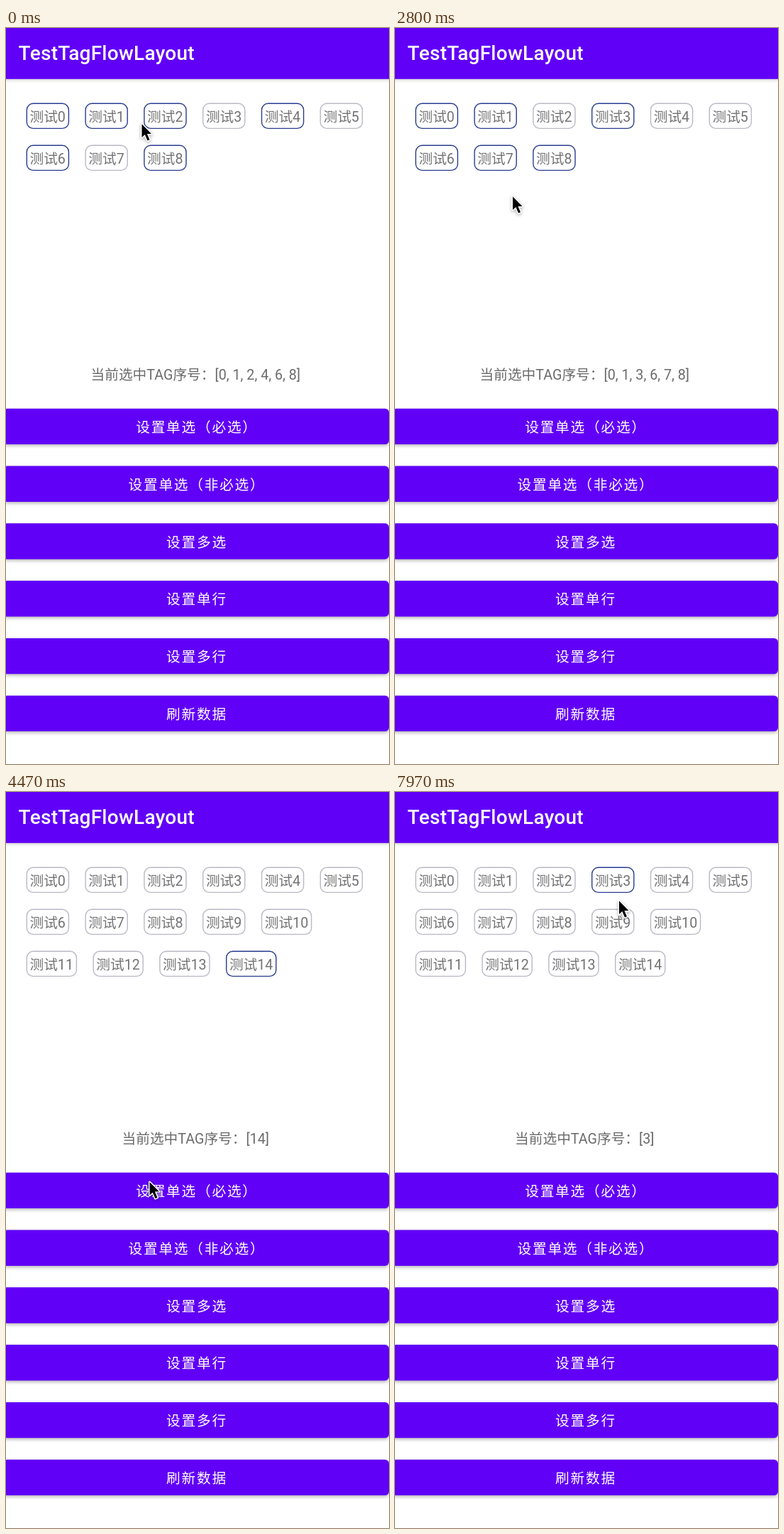
Animation of 540 by 1036 pixels, one loop 8000 ms. Source, as an HTML page with a canvas:

```html
<!DOCTYPE html>
<html lang="zh-CN">
<head>
<meta charset="utf-8">
<title>TestTagFlowLayout</title>
<style>
html, body { margin: 0; width: 100%; height: 100%; overflow: hidden; background: #fff; }
canvas { display: block; width: 540px; height: 1036px; }
</style>
</head>
<body>
<canvas id="stage"></canvas>
<script>
const W = 540, H = 1036, LOOP = 8000;
const PURPLE = '#6100f7';
const FONT = 'Roboto, "Noto Sans CJK SC", "Noto Sans CJK", sans-serif';
const SIZE = 19.7;
const BUTTONS = ['设置单选（必选）', '设置单选（非必选）', '设置多选', '设置单行', '设置多行', '刷新数据'];
const BTN = { x: -4, y: 535.7, w: 544, h: 50.4, step: 80.8, radius: 5.6 };
const TAG = { x: 28.6, y: 105.6, h: 36.5, gap: 22.3, row: 59, right: 515 };
const HOLD = 70; // how long the button stays down before its click

// A click on a tag, or on the first button, which refills the list.
const CLICKS = [
  { at: 530, tag: 2 }, { at: 1130, tag: 3 }, { at: 1830, tag: 4 }, { at: 2430, tag: 7 },
  { at: 3510, refill: 1 }, { at: 4110, refill: 15 },
  { at: 5700, tag: 1 }, { at: 6250, tag: 8 }, { at: 6850, tag: 2 }, { at: 7770, tag: 3 }
];

// Where the pointer wanders between clicks.
const WANDER = [
  { t: 0, x: 191.5, y: 135.3 }, { t: 1470, x: 441.5, y: 130.3 }, { t: 2700, x: 166, y: 237.3 },
  { t: 2800, x: 166, y: 237.3 }, { t: 4470, x: 202.5, y: 549 }, { t: 6530, x: 240.5, y: 120.3 },
  { t: 7300, x: 343, y: 123 }, { t: 7970, x: 316, y: 153.3 }
];

const ctx = document.getElementById('stage').getContext('2d');
const dpr = window.devicePixelRatio || 1;
ctx.canvas.width = W * dpr;
ctx.canvas.height = H * dpr;

const lerp = (a, b, k) => a + (b - a) * k;
const clamp = v => Math.max(0, Math.min(1, v));
const smooth = k => k * k * (3 - 2 * k);

function layoutTags(count) {
  let { x, y } = TAG;
  return Array.from({ length: count }, (_, i) => {
    const w = i < 10 ? 60.5 : 71.5;
    if (x + w > TAG.right) {
      x = TAG.x;
      y += TAG.row;
    }
    const box = { x, y, w };
    x += w + TAG.gap;
    return box;
  });
}

// Replays the clicks; after a refill only one tag stays selected.
function stateAt(t) {
  let count = 9, selected = [0, 1, 2, 4, 6, 8], single = false;
  for (const { at, tag, refill } of CLICKS) {
    if (at > t) break;
    if (refill) {
      count = refill;
      selected = [refill - 1];
      single = true;
    } else if (single) {
      selected = [tag];
    } else if (selected.includes(tag)) {
      selected = selected.filter(i => i !== tag);
    } else {
      selected = [...selected, tag].sort((a, b) => a - b);
    }
  }
  return { count, selected };
}

// The pointer rests on its target around every click.
function buildPath() {
  const boxes = layoutTags(15);
  const rests = CLICKS.flatMap(({ at, tag, refill }) => {
    const box = boxes[tag];
    const aim = refill ? { x: 210, y: 562.3 } : { x: box.x + box.w * 0.65, y: box.y + TAG.h / 2 };
    return [{ t: at - 160, ...aim }, { t: at + 100, ...aim }];
  });
  return [...rests, ...WANDER].sort((a, b) => a.t - b.t);
}
const path = buildPath();

function text(str, x, y, size, color, { center = false, weight = 400, spacing = 0 } = {}) {
  ctx.font = `${weight} ${size}px ${FONT}`;
  ctx.letterSpacing = spacing + 'px';
  ctx.fillStyle = color;
  if (center) x -= ctx.measureText(str).width / 2;
  ctx.fillText(str, x, y);
}

function shadow(alpha, blur, dy) {
  ctx.shadowColor = `rgba(0,0,0,${alpha})`;
  ctx.shadowBlur = blur * dpr;
  ctx.shadowOffsetY = dy * dpr;
}

function roundRect(x, y, w, h, r) {
  ctx.beginPath();
  ctx.roundRect(x, y, w, h, r);
}

function drawHeader() {
  ctx.save();
  shadow(0.22, 5, 1);
  ctx.fillStyle = PURPLE;
  ctx.fillRect(-10, -10, W + 20, 81.8);
  ctx.restore();
  text('TestTagFlowLayout', 17.6, 44.8, 28, '#fff', { weight: 500, spacing: 0.25 });
}

function drawTags({ count, selected }) {
  layoutTags(count).forEach(({ x, y, w }, i) => {
    roundRect(x + 0.7, y + 0.7, w - 1.4, TAG.h - 1.4, 9);
    ctx.lineWidth = 1.4;
    ctx.strokeStyle = selected.includes(i) ? '#283c90' : '#b9b9c6';
    ctx.stroke();
    text('测试' + i, x + 4.9, y + 26.2, SIZE, '#737373');
  });
}

function drawRipple(t) {
  for (const click of CLICKS) {
    const age = t - click.at + HOLD;
    if (!click.refill || age < 0 || age > 375) continue;
    const k = smooth(clamp(age / 190));
    ctx.save();
    roundRect(BTN.x, BTN.y, BTN.w, BTN.h, BTN.radius);
    ctx.clip();
    ctx.globalAlpha = clamp(age / 75) * (1 - clamp((age - 225) / 150));
    ctx.fillStyle = '#8626fb';
    ctx.beginPath();
    ctx.arc(lerp(212, 268, k), BTN.y + BTN.h / 2, lerp(170, 281, k), 0, Math.PI * 2);
    ctx.fill();
    ctx.restore();
  }
}

function liftAt(t) {
  return CLICKS.filter(c => c.refill).reduce((sum, { at }) =>
    sum + clamp((t - at + HOLD) / 60) * (1 - clamp((t - at - 20) / 100)), 0);
}

function drawButtons(t) {
  BUTTONS.forEach((label, i) => {
    const y = BTN.y + BTN.step * i;
    const k = i ? 0 : liftAt(t);
    ctx.save();
    shadow(lerp(0.3, 0.36, k), lerp(5, 15, k), lerp(2, 6, k));
    ctx.fillStyle = PURPLE;
    roundRect(BTN.x, y, BTN.w, BTN.h, BTN.radius);
    ctx.fill();
    ctx.restore();
    if (!i) drawRipple(t);
    text(label, 269, y + 33.2, SIZE, '#fff', { center: true, spacing: SIZE * 0.0893 });
  });
}

const arrow = new Path2D('M0 0V18.6L4.3 14.7L8 23.2L11 21.9L7.4 13.6H13.5Z');

function drawPointer(t) {
  const next = path.find(p => p.t > t) || path[path.length - 1];
  const prev = path[path.indexOf(next) - 1];
  const k = smooth(clamp((t - prev.t) / (next.t - prev.t)));
  ctx.save();
  ctx.translate(lerp(prev.x, next.x, k), lerp(prev.y, next.y, k));
  ctx.lineWidth = 3;
  ctx.lineJoin = 'round';
  ctx.strokeStyle = '#fff';
  shadow(0.35, 4, 1.5);
  ctx.stroke(arrow);
  shadow(0, 0, 0);
  ctx.fillStyle = '#000';
  ctx.fill(arrow);
  ctx.restore();
}

function draw(t) {
  const state = stateAt(t);
  ctx.setTransform(dpr, 0, 0, dpr, 0, 0);
  ctx.fillStyle = '#fff';
  ctx.fillRect(0, 0, W, H);
  drawHeader();
  drawTags(state);
  text(`当前选中TAG序号：[${state.selected.join(', ')}]`, 267.3, 495, SIZE, '#6b6b6b', { center: true });
  drawButtons(t);
  drawPointer(t);
}

const start = performance.now();
function tick() {
  draw((performance.now() - start) % LOOP);
  requestAnimationFrame(tick);
}
tick();
</script>
</body>
</html>
```
